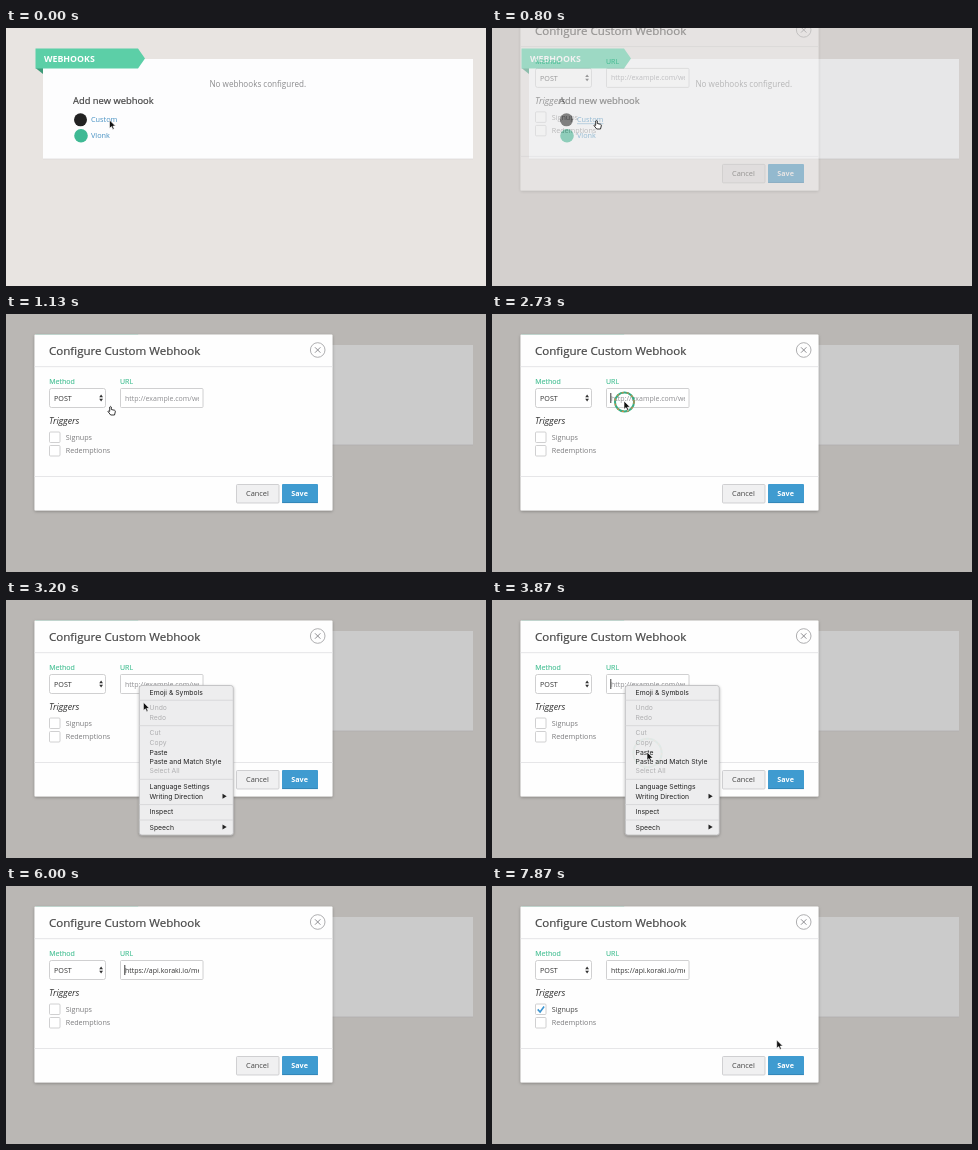
An HTML page that plays this animation: 480 px wide and 258 px high, repeating every 8 s.

```html
<!DOCTYPE html>
<html lang="en">
<head>
<meta charset="utf-8">
<title>Configure webhook</title>
<style>
html, body { margin: 0; width: 100%; height: 100%; overflow: hidden; background: #e8e4e1; }
svg { display: block; width: 480px; height: 258px; }
text { font-family: "Open Sans", "Noto Sans", sans-serif; font-size: 7.2px; white-space: pre; }
#menu text { font-family: Inter, "Liberation Sans", sans-serif; font-size: 6.8px; }
.box { fill: #fff; stroke: #c4c4c6; stroke-width: .8; }
.label { fill: #45bf93; stroke: #45bf93; stroke-width: .12; font-size: 7px; }
.link { fill: #4590c2; font-size: 7.3px; }
.head { fill: #444; stroke: #444; stroke-width: .2; }
</style>
</head>
<body>
<svg viewBox="0 0 480 258" xmlns="http://www.w3.org/2000/svg">
  <defs>
    <clipPath id="field"><rect x="117" y="75" width="76" height="18"/></clipPath>
    <filter id="shadow" x="-20%" y="-20%" width="140%" height="140%">
      <feDropShadow dx="0" dy="1" stdDeviation="1.5" flood-opacity=".3"/>
    </filter>
  </defs>

  <rect width="480" height="258" fill="#e8e4e1"/>
  <rect x="37" y="31" width="430" height="100" fill="#fdfdfe"/>
  <path d="M37 131H467" stroke="#d8d5d5" stroke-width=".7"/>
  <path d="M29.5 40H37V46Z" fill="#3d9a78"/>
  <path d="M29.5 20.5H132L139 30.5 132 40.5H29.5Z" fill="#5ccfa7"/>
  <text x="38" y="33.7" fill="#fff" font-weight="700" style="font-size:8.8px">WEBHOOKS</text>
  <text x="203.5" y="58.7" fill="#8b8b8d" style="font-size:8.1px">No webhooks configured.</text>
  <text x="67" y="76.2" class="head" style="font-size:9.4px">Add new webhook</text>
  <circle cx="74.5" cy="91.8" r="6.5" fill="#222"/>
  <circle cx="75" cy="107.8" r="6.8" fill="#3fb994"/>
  <text x="85" y="94.3" class="link">Custom</text>
  <path id="underline" d="M85 95.7H111.5" stroke="#4590c2" stroke-width=".6"/>
  <text x="85" y="110" class="link">Vlonk</text>

  <rect id="backdrop" width="480" height="258"/>

  <g id="modal">
    <rect x="28.5" y="20.5" width="298" height="176" rx="1" fill="#fefefe" filter="url(#shadow)"/>
    <path d="M28.5 52.7H326.5M28.5 162.5H326.5" stroke="#e4e4e6" stroke-width=".9"/>
    <text x="43" y="41.3" class="head" style="font-size:11.55px">Configure Custom Webhook</text>
    <circle cx="311.7" cy="36" r="7.3" fill="none" stroke="#a5a5a8" stroke-width=".9"/>
    <path d="M309 33.3l5.4 5.4m0-5.4l-5.4 5.4" stroke="#8e8e92" stroke-width="1"/>
    <text x="43.3" y="70.3" class="label">Method</text>
    <text x="114" y="70.3" class="label">URL</text>
    <rect class="box" x="43.5" y="74.5" width="56" height="19" rx="2"/>
    <text x="48" y="86.7" fill="#333">POST</text>
    <path d="M93.2 83.2l1.9-2.6 1.9 2.6zM93.2 84.8l1.9 2.6 1.9-2.6z" fill="#333"/>
    <rect class="box" x="114.5" y="74.5" width="82.5" height="19" rx="1"/>
    <g clip-path="url(#field)"><text id="url" y="86.6" style="font-size:7px"></text></g>
    <path id="caret" d="M0 79V89" stroke="#222" stroke-width=".9"/>
    <text x="43" y="109.8" fill="#333" font-style="italic" style="font-size:8.9px">Triggers</text>
    <rect class="box" x="43.5" y="118" width="10.5" height="10.5" rx="1"/>
    <rect class="box" x="43.5" y="131.5" width="10.5" height="10.5" rx="1"/>
    <path id="check" d="M45.7 123.4l2.4 2.6 4-5.4" fill="none" stroke="#3b94d0" stroke-width="1.6"/>
    <text id="signups" x="59.7" y="125.8">Signups</text>
    <text x="59.7" y="139.2" fill="#7b7b7d">Redemptions</text>
    <rect x="230.5" y="170.5" width="42.5" height="18.5" rx="1" fill="#f0f0f1" stroke="#c6c6c8" stroke-width=".8"/>
    <text x="240" y="182.2" fill="#444" style="font-size:7.4px">Cancel</text>
    <rect x="276" y="170" width="36" height="19" rx="1" fill="#3f9bd0"/>
    <path d="M276 188.6H312" stroke="#2f7fb0" stroke-width=".8"/>
    <text x="285.3" y="182.2" fill="#fff" font-weight="700">Save</text>
  </g>

  <g id="menu">
    <rect x="133.3" y="85.5" width="94" height="149.5" rx="2.5" fill="#ededee" stroke="#b5b5b7" stroke-width=".7" filter="url(#shadow)"/>
    <path d="M133.5 100.2H227M133.5 125.7H227M133.5 179.3H227M133.5 204.6H227M133.5 220H227" stroke="#d6d6d8" stroke-width=".9"/>
    <g id="items"></g>
  </g>

  <g id="ring" fill="none" stroke-width="2">
    <circle stroke="#35ad83"/>
    <circle stroke="#e0873f" stroke-dasharray="2 3.2" stroke-width="1.1"/>
  </g>
  <g id="cursor" stroke="#fff" stroke-width=".6" stroke-linejoin="round">
    <path id="arrow" d="M0 0V8.3L2 6.6 3.3 9.4 4.7 8.8 3.4 6.1H6Z" fill="#111"/>
    <path id="hand" d="M.2 1Q1-.2 1.8 1V3.5L5.2 4.3Q6 4.6 5.8 5.8L5 9H1.2L-1.5 5.6Q-1.6 4.4.2 5.4Z" fill="#fff" stroke="#222" stroke-width=".9"/>
  </g>
</svg>
<script>
const LOOP = 8000;
const $ = id => document.getElementById(id);
const clamp = v => Math.max(0, Math.min(1, v));
const progress = (t, from, to) => clamp((t - from) / (to - from));
const between = (t, from, to) => t >= from && t < to;
const show = (node, on) => node.setAttribute('visibility', on ? 'visible' : 'hidden');
const set = (node, attrs) => { for (const k in attrs) node.setAttribute(k, attrs[k]); };

// time, x, y of the pointer tip
const path = [
  [0, 103.5, 92], [1600, 103.5, 92], [1870, 132, 87], [3050, 132, 87],
  [3530, 155, 152], [4920, 155, 152], [5010, 176, -12], [5980, 178, -12],
  [6450, 48, 120], [7200, 48, 120], [7330, 284, 153.5], [7670, 284, 153.5], [7870, 284.7, 154]
];
const clicks = [330, 2730, 3600, 6500];
const CLICK_MS = 290;

// label, baseline, enabled, has submenu
const entries = [
  ['Emoji & Symbols', 94.6, 1], ['Undo', 110, 0], ['Redo', 119.8, 0],
  ['Cut', 135.3, 0], ['Copy', 145, 0], ['Paste', 154.6, 1],
  ['Paste and Match Style', 164, 1], ['Select All', 173.4, 0],
  ['Language Settings', 189.2, 1], ['Writing Direction', 198.7, 1, 1],
  ['Inspect', 214.2, 1], ['Speech', 229.6, 1, 1]
];

function add(parent, tag, attrs, text = '') {
  const node = document.createElementNS('http://www.w3.org/2000/svg', tag);
  set(node, attrs);
  node.textContent = text;
  return parent.appendChild(node);
}

const items = entries.map(([label, y, enabled, sub]) => {
  const bar = add($('items'), 'rect', { x: 133.6, y: y - 7.2, width: 93.4, height: 9.6, fill: '#3f87f5' });
  const text = add($('items'), 'text', { x: 143.6, y }, label);
  if (sub) add($('items'), 'path', { d: `M216.5 ${y - 5}l4.2 2.5-4.2 2.5z`, fill: '#222' });
  return { bar, text, y, enabled };
});

function pointerAt(t) {
  const i = path.findIndex(p => p[0] > t);
  if (i < 0) return path[path.length - 1].slice(1);
  const [a, b] = [path[i - 1], path[i]];
  let k = progress(t, a[0], b[0]);
  k = k * k * (3 - 2 * k);
  return [a[1] + (b[1] - a[1]) * k, a[2] + (b[2] - a[2]) * k];
}

function drawModal(t) {
  const open = 1 - (1 - progress(t, 710, 1080)) ** 2;
  set($('backdrop'), { opacity: .2 * open });
  set($('modal'), { opacity: open, transform: `translate(0 ${-60 * (1 - open)})` });
  show($('underline'), t >= 70);

  const pasted = t >= 4130, atEnd = pasted && t < 5600;
  const url = $('url');
  url.textContent = !pasted ? 'http://example.com/webhook'
    : atEnd ? 'i.koraki.io/merchants/webhooks' : 'https://api.koraki.io/merchants';
  set(url, { x: atEnd ? 191 : 119, 'text-anchor': atEnd ? 'end' : 'start', fill: pasted ? '#333' : '#8d8d90' });

  const caretOn = [[2400, 2930], [3470, 4730], [5270, 6130], [6670, 6900]].some(r => between(t, ...r));
  show($('caret'), caretOn);
  set($('caret'), { transform: `translate(${atEnd ? 192 : 118.8} 0)` });

  const checked = t >= 6560;
  show($('check'), checked);
  set($('signups'), { fill: checked ? '#444' : '#7b7b7d' });
}

function drawMenu(t, y) {
  show($('menu'), between(t, 2900, 4270));
  set($('menu'), { opacity: 1 - progress(t, 4060, 4270) });
  const blink = between(t, 3800, 3930);
  for (const item of items) {
    const hot = item.enabled && !blink && between(t, 3050, 4270) && between(y, item.y - 7.2, item.y + 2.4);
    item.bar.setAttribute('opacity', hot ? 1 : 0);
    item.text.setAttribute('fill', hot ? '#fff' : item.enabled ? '#222' : '#b0b0b2');
  }
}

function drawPointer(t, x, y) {
  const hand = between(t, 70, 1600);
  show($('arrow'), !hand);
  show($('hand'), hand);
  set($('cursor'), { transform: `translate(${x} ${y})` });

  const start = clicks.find(c => between(t, c, c + CLICK_MS));
  show($('ring'), start !== undefined);
  if (start === undefined) return;
  const age = (t - start) / CLICK_MS;
  set($('ring'), { transform: `translate(${x + .5} ${y + 1})`, opacity: 1 - age });
  for (const c of $('ring').children) c.setAttribute('r', 9.5 + 5 * age);
}

function draw(t) {
  const [x, y] = pointerAt(t);
  drawModal(t);
  drawMenu(t, y);
  drawPointer(t, x, y);
}

const began = performance.now();
function tick() {
  draw((performance.now() - began) % LOOP);
  requestAnimationFrame(tick);
}
tick();
</script>
</body>
</html>
```
